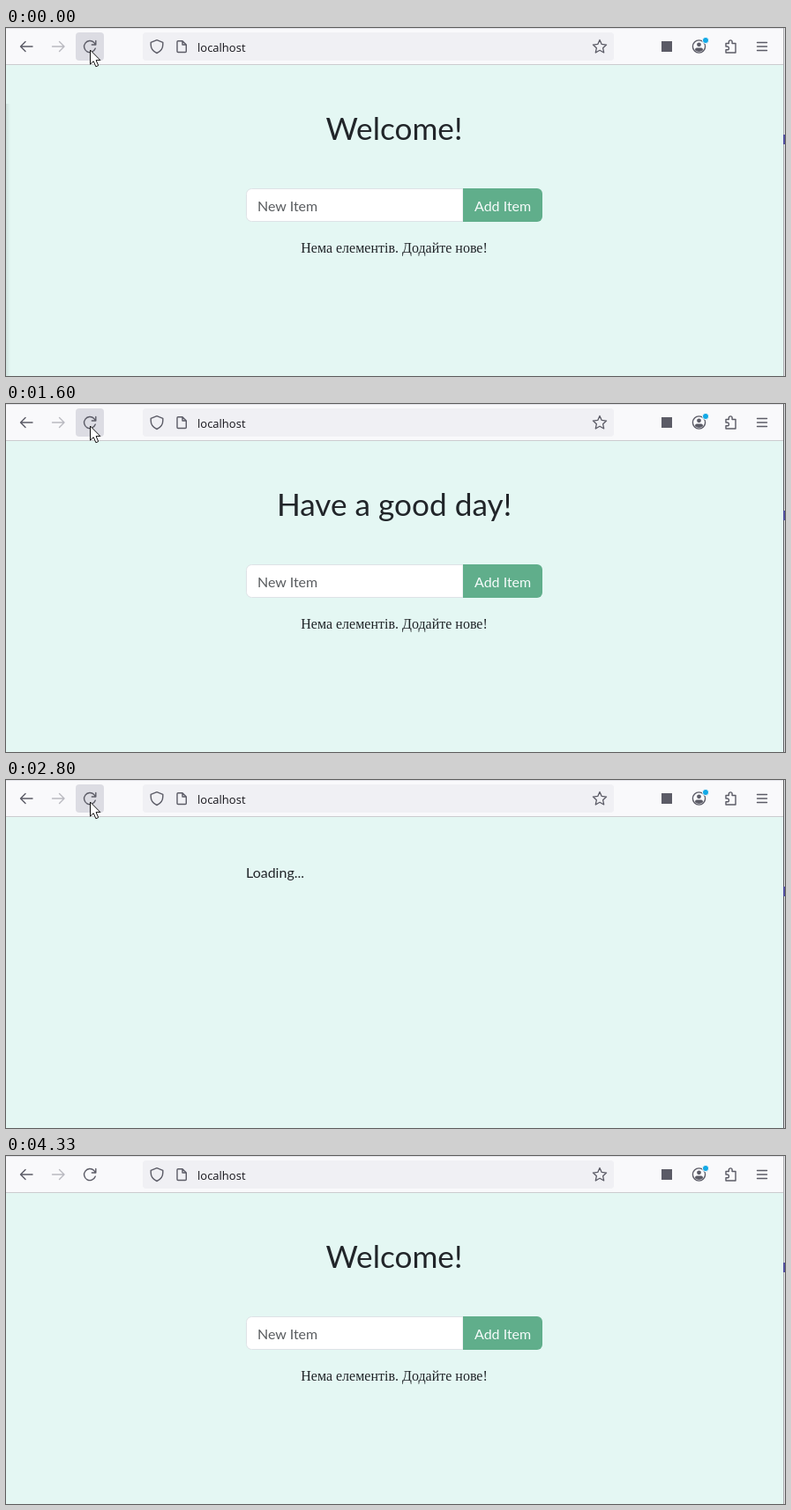
Recreate the animation shown at these times as an HTML page. Size 883 px wide and 395 px high, loop 4.87 s.

```html
<!DOCTYPE html>
<html lang="en">
<head>
<meta charset="utf-8">
<title>Greeting page reload</title>
<style>
html, body { margin: 0; width: 100%; height: 100%; overflow: hidden; background: #fff; }
svg { display: block; width: 883px; height: 395px; }
text { font: 16px Lato, sans-serif; fill: #212529; }
.title { font-size: 35.2px; text-anchor: middle; }
.url { font: 13px "Open Sans", sans-serif; fill: #15141a; }
.note { font: 16px "Liberation Serif", serif; text-anchor: middle; }
.icon { fill: none; stroke: #5b5b66; stroke-width: 1.4; stroke-linecap: round; stroke-linejoin: round; }
.solid { fill: #5b5b66; }
</style>
</head>
<body>
<svg viewBox="0 0 883 395">
  <defs>
    <linearGradient id="shade">
      <stop offset="0" stop-color="#cfe2de"/>
      <stop offset="1" stop-color="#e4f7f3"/>
    </linearGradient>
  </defs>

  <rect width="883" height="395" fill="#fff"/>
  <g id="page">
    <rect y="42" width="881" height="353" fill="#e4f7f3"/>
    <rect id="shadow" y="86" width="5" height="309" fill="url(#shade)"/>
    <text id="title" class="title" x="440" y="127"></text>
    <text id="loading" x="272">Loading...</text>
    <g id="form">
      <path d="M518 182.5H278.5A6 6 0 0 0 272.5 188.5V213.5A6 6 0 0 0 278.5 219.5H518Z" fill="#fff" stroke="#dee2e6"/>
      <path d="M518 182H602A6 6 0 0 1 608 188V214A6 6 0 0 1 602 220H518Z" fill="#60ae8b"/>
      <text x="285" y="208" style="fill:#595c5f">New Item</text>
      <text x="531" y="208" style="fill:#f6fcfb">Add Item</text>
      <text class="note" x="440" y="255">Нема елементів. Додайте нове!</text>
    </g>
  </g>

  <rect width="881" height="41" fill="#f9f9fb"/>
  <rect width="881" height="1" fill="#e3e3e8"/>
  <rect y="41" width="881" height="1" fill="#cccccf"/>
  <rect id="button" x="79" y="5" width="32" height="32" rx="4"/>
  <rect x="155" y="5" width="534" height="32" rx="4" fill="#f0f0f4"/>
  <text class="url" x="217" y="27">localhost</text>

  <g class="icon">
    <path d="M30 21H17M22 15.5L16.5 21L22 26.5"/>
    <path d="M52.5 21H66M60.5 15.5L66 21L60.5 26.5" stroke="#b9b9c0"/>
    <path id="reload"/>
    <path d="M171 13.7L177.8 16.3V19C177.8 23.5 175 26.7 171 28.5C167 26.7 164.2 23.5 164.2 19V16.3Z"/>
    <path d="M195 14.7H200L204.3 19V26.5A1 1 0 0 1 203.3 27.5H195A1 1 0 0 1 194 26.5V15.7A1 1 0 0 1 195 14.7M200 14.7V19H204.3"/>
    <path id="star" stroke-width="1.3"/>
    <circle cx="785.5" cy="21" r="7.1"/>
    <path d="M816 17.5H819.3V15.8A1.9 1.9 0 0 1 823.1 15.8V17.5H827V28H816V24.8H817.5A1.9 1.9 0 0 0 817.5 21H816Z"/>
    <path d="M851.5 16.5H862.5M851.5 21H862.5M851.5 25.5H862.5"/>
  </g>
  <rect class="solid" x="743" y="15" width="12" height="12"/>
  <circle class="solid" cx="785.5" cy="18.8" r="2.4"/>
  <path class="solid" d="M781 25.3V24.4A2 2 0 0 1 783 22.4H788A2 2 0 0 1 790 24.4V25.3Q785.5 28.5 781 25.3Z"/>
  <circle cx="793" cy="14" r="3.6" fill="#12a9e6" stroke="#f9f9fb"/>

  <rect id="edge" x="881" width="1" height="395"/>
  <rect x="882" width="1" height="395" fill="#e6e6e9"/>
  <rect x="881" y="121" width="2" height="11" fill="#5350a0"/>
  <path id="cursor" d="M0 0V16.2L3.7 12.7L6.4 18.8L9.2 17.6L6.6 11.6H11.4Z" fill="#fff" stroke="#111"/>
</svg>
<script>
const LOOP = 4870;
const WELCOME = "Welcome!", GOOD_DAY = "Have a good day!";
const $ = id => document.getElementById(id);
const show = (id, on) => $(id).style.display = on ? "" : "none";

// Each step: start time, phase, heading
const steps = [
  [0, "full", WELCOME],
  [470, "press", WELCOME], [530, "blank", ""], [600, "load", ""], [670, "load", WELCOME], [730, "full", WELCOME],
  [1330, "press", WELCOME], [1400, "blank", ""], [1470, "load", ""], [1530, "load", GOOD_DAY], [1600, "full", GOOD_DAY],
  [2000, "press", GOOD_DAY], [2130, "full", GOOD_DAY], [2200, "blank", ""], [2270, "full", WELCOME],
  [2600, "press", WELCOME], [2730, "blank", ""], [2800, "load", ""], [2870, "full", WELCOME],
  [3130, "press", WELCOME], [3270, "blank", ""], [3330, "load", ""], [3400, "load", WELCOME], [3470, "full", WELCOME]
];
const ARROW = "M101.2 23.2A6.5 6.5 0 1 1 99.8 16.6L101.5 18.5M101.8 14.5V19H97.3";
const TURNING = "M100.8 24.2A6.5 6.5 0 1 0 89.5 24.6M88.7 21.5V26H93";

$("star").setAttribute("d", "M" + Array.from({ length: 10 }, (_, i) => {
  const a = i * Math.PI / 5, r = i % 2 ? 3.8 : 8;
  return `${673 + r * Math.sin(a)} ${21.5 - r * Math.cos(a)}`;
}).join("L") + "Z");

function draw(t) {
  const [, phase, title] = steps.findLast(s => s[0] <= t);
  show("page", phase != "blank");
  show("loading", phase == "load");
  show("form", phase == "full" || phase == "press");
  show("shadow", t < 470);
  $("title").textContent = title;
  $("loading").setAttribute("y", title ? 201 : 111);
  $("reload").setAttribute("d", phase == "blank" ? TURNING : ARROW);
  $("button").setAttribute("fill", t >= 3930 ? "none" : phase == "press" ? "#cfcfd8" : "#dcdce3");
  $("edge").setAttribute("fill", t < 470 || t >= 4330 ? "#acacb0" : "#5c5c60");

  // The pointer speeds up on its way out through the bottom edge
  const k = t < 3800 ? 0 : Math.min(1, (Math.floor((t - 3800) / 66.7) + 1) / 7);
  $("cursor").setAttribute("transform", `translate(${95.5 - 74 * k * k} ${25 + 375 * k * k})`);
}

function tick() {
  draw(performance.now() % LOOP);
  requestAnimationFrame(tick);
}
tick();
</script>
</body>
</html>
```
